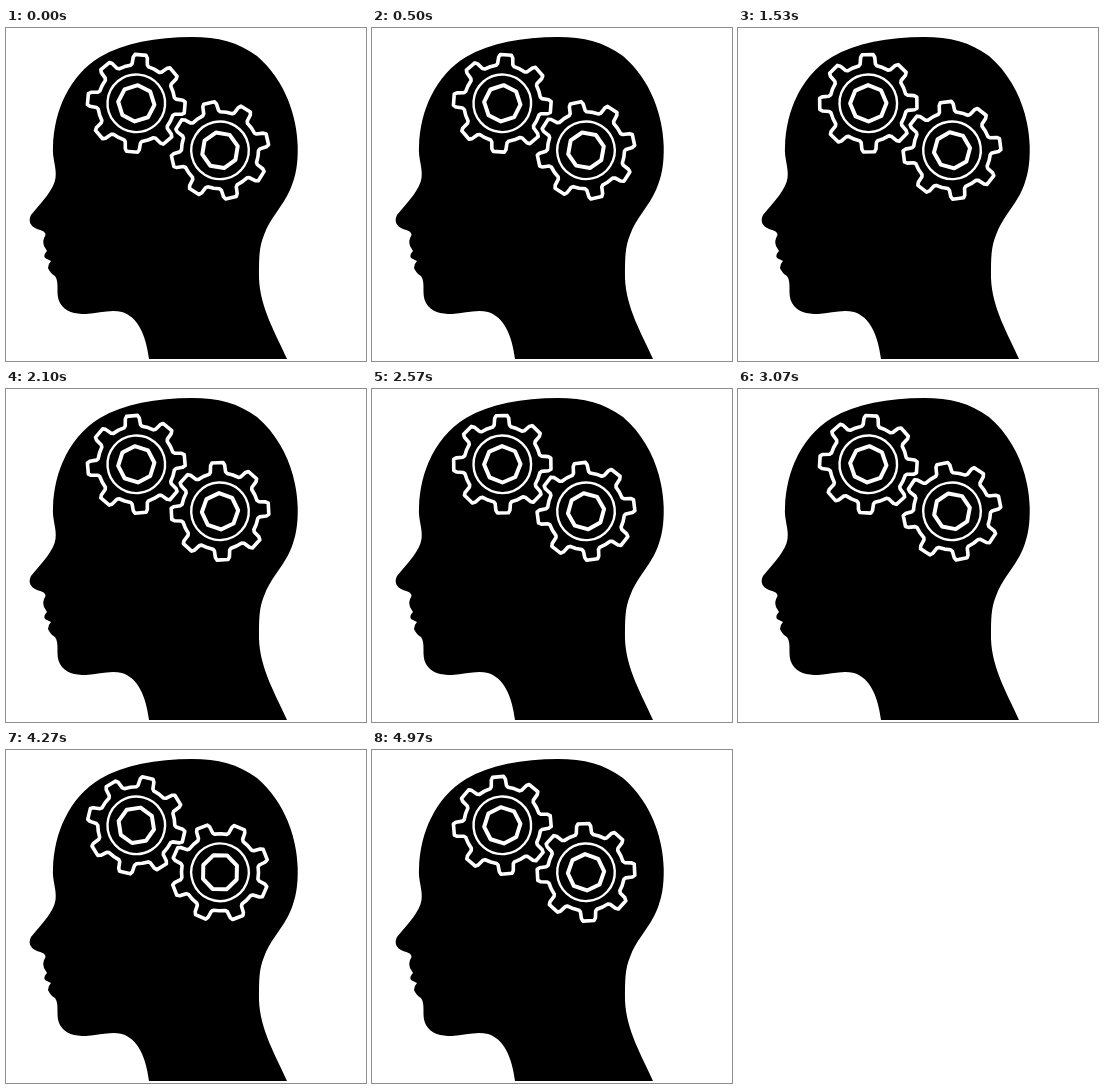
Animation, 360 px wide and 333 px high, one loop 5.07 s. Source, as an HTML page:

```html
<!DOCTYPE html>
<html lang="en">
<head>
<meta charset="utf-8">
<title>Thinking head</title>
<style>
  html, body { margin: 0; width: 100%; height: 100%; overflow: hidden; background: #fff; }
  svg { display: block; width: 100vw; height: 100vh; }
  .gear { fill: none; stroke: #fff; stroke-linejoin: round; }
</style>
</head>
<body>
<svg viewBox="0 0 360 333">
  <path d="M143 331H281C270 306 254 280 253 250C253 230 253 219 258 207
    C264 190 277 178 284 162C290 148 292 136 291.700 118C291 88 279 52 251 28
    C232 14 212 9 186 9C150 9 118 15 94 29C64 47 48 82 47 119
    C46 130 51 140 49.500 150C48 161 37 173 25 187C22 193 24 198 31 201
    Q40 203 39.500 207Q36 213 38 218L41 223Q37 227 39 230L45 233Q42 236 42 240
    Q44 245 49 248C54 255 49 266 54 275C59 284 69 286 80 286
    C93 285 105 281 116 284C132 289 140 307 143 331Z"/>
  <g id="gears"></g>
</svg>
<script>
const LOOP = 5070, TICK = 1000 / 30, STEPS_PER_TICK = 5 / 12;
const TEETH = 8, PITCH = 360 / TEETH;
const NS = "http://www.w3.org/2000/svg";

// Turn of the left gear: [step, degrees].
const TURN = [[0, 5], [12, -86.5], [26, -185], [38, -266.5],
              [47, -349], [53, -391.5], [62, -455]];

const polar = (r, deg) => {
  const a = deg * Math.PI / 180;
  return [r * Math.sin(a), -r * Math.cos(a)];
};
const closed = pts => "M" + pts.map(p => p.map(v => v.toFixed(2)).join(" ")).join("L") + "Z";

// Tooth profile as [radius, angle] pairs around its axis.
const TOOTH = [[38.5, -13.5], [40, -11], [46.5, -8.7], [48.9, -6.5],
               [48.9, 6.5], [46.5, 8.7], [40, 11], [38.5, 13.5], [38.5, 22.5]];

const ring = [], hub = [];
for (let i = 0; i < TEETH; i++) {
  TOOTH.forEach(([r, a]) => ring.push(polar(r, a + i * PITCH)));
  hub.push(polar(18.2, i * PITCH));
}

function add(parent, tag, attrs) {
  const el = document.createElementNS(NS, tag);
  for (const k in attrs) el.setAttribute(k, attrs[k]);
  return parent.appendChild(el);
}

function makeGear(x, y, offset, dir) {
  const g = add(document.getElementById("gears"), "g", { class: "gear" });
  add(g, "path", { d: closed(ring), "stroke-width": 3.6 });
  add(g, "circle", { r: 28.8, "stroke-width": 2.4 });
  add(g, "path", { d: closed(hub), "stroke-width": 4 });
  return angle => g.setAttribute("transform",
    `translate(${x} ${y}) rotate(${offset + dir * angle})`);
}

const gears = [makeGear(130.3, 75.3, 0, 1), makeGear(214, 122.3, -8, -1)];

// 12.5 steps per second, shown on a 30 per second clock.
const stepAt = ms => Math.floor(Math.floor(ms / TICK + 0.2) * STEPS_PER_TICK);

function angleAt(step) {
  const i = Math.max(1, TURN.findIndex(([s]) => s >= step));
  const [[s0, a0], [s1, a1]] = [TURN[i - 1], TURN[i]];
  return a0 + (a1 - a0) * (step - s0) / (s1 - s0);
}

function draw(now) {
  const angle = angleAt(Math.min(stepAt(now % LOOP), 62));
  gears.forEach(turn => turn(angle));
  requestAnimationFrame(draw);
}
draw(performance.now());
</script>
</body>
</html>
```
